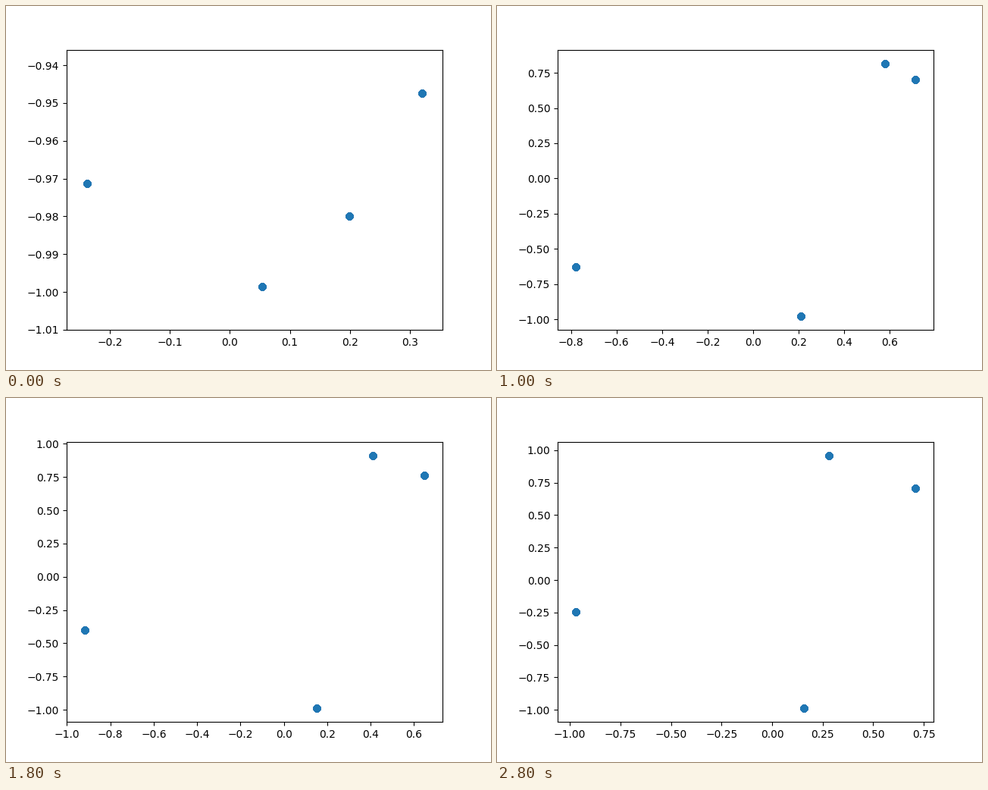
A matplotlib script that plays this animation: 640x480 px, repeating every 2900 ms.

```python
import numpy as np
import matplotlib.pyplot as plt
from matplotlib.animation import FuncAnimation

FRAMES, INTERVAL = 29, 100
COPIES = 100  # stacked markers give the dots their hard edge
MARGIN = 0.05
MARKER_PAD = 3 / np.array([496, 369.6])  # marker radius as a share of the axes
SLOWDOWN = 4  # time constant, in steps, of the settling motion

# Key poses: the angle in degrees of each dot on the unit circle
KEY_STEPS = np.array([0, 3, 10, 16, 20, 24, 28])
KEY_ANGLES = [
    [-103.76, -127.7, -141.05, -148.5, -161.25, -164.67, -165.97],
    [-86.95, -79, -77.88, -83.28, -80.07, -80.9, -80.87],
    [-78.52, 24.7, 54.65, 64.15, 66.8, 68.3, 73.65],
    [-71.33, 24.2, 44.65, 50.84, 49.05, 46.3, 44.95],
]


def ease(step):
    return 1 - np.exp(-step / SLOWDOWN)


def dots(step):
    angles = np.radians([np.interp(ease(step), ease(KEY_STEPS), keys)
                         for keys in KEY_ANGLES])
    return np.column_stack([np.cos(angles), np.sin(angles)])


def limits(points):
    low = points.min(axis=0) - MARKER_PAD
    high = points.max(axis=0) + MARKER_PAD
    pad = MARGIN * (high - low)
    return low - pad, high + pad


fig, ax = plt.subplots(figsize=(6.4, 4.8), dpi=100)
scatter = ax.scatter([], [], color="#1f77b4")


def update(step):
    points = dots(step)
    (left, bottom), (right, top) = limits(points)
    scatter.set_offsets(np.tile(points, (COPIES, 1)))
    ax.set_xlim(left, right)
    ax.set_ylim(bottom, top)
    return (scatter,)


anim = FuncAnimation(fig, update, frames=FRAMES, interval=INTERVAL,
                     init_func=lambda: update(0), repeat=True, blit=False)
plt.show()
```
